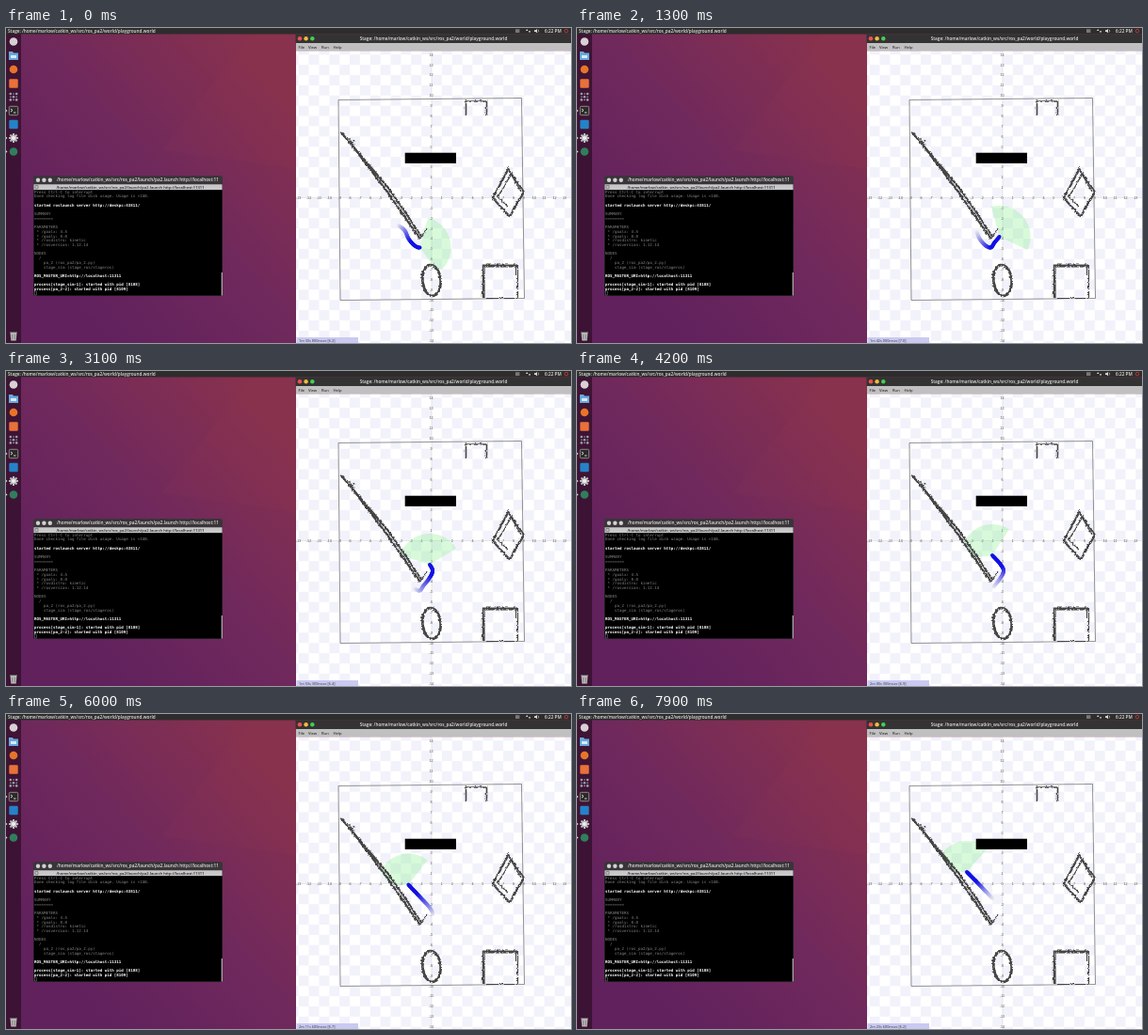
An HTML page that plays this animation: 600 px wide and 335 px high, repeating every 8 s.

```html
<!DOCTYPE html>
<html lang="en">
<head>
<meta charset="utf-8">
<title>Robot simulation</title>
<style>
html, body { margin: 0; width: 100%; height: 100%; overflow: hidden; background: #2d2d2d; }
svg { display: block; width: 100vw; height: 100vh; }
text { white-space: pre; }
.title { font: 600 4.7px "Open Sans", "Noto Sans", sans-serif; fill: #e4e2de; }
.tab { font: 600 4.1px "Open Sans", "Noto Sans", sans-serif; fill: #222; }
.menu { font: 4.2px "Open Sans", "Noto Sans", sans-serif; fill: #111; }
.status { font: 3.8px "Open Sans", "Noto Sans", sans-serif; fill: #333; }
.term { font: 4.15px "DejaVu Sans Mono", "Liberation Mono", monospace; fill: #858585; }
.term .strong { font-weight: bold; fill: #fff; }
.axis { font: 3.7px "Liberation Sans", Arial, sans-serif; fill: #555; text-anchor: middle; }
.wall { fill: none; stroke: #444; stroke-width: 2.2; }
.thin { stroke-width: 1.2; }
</style>
</head>
<body>
<svg id="stage" viewBox="0 0 600 335" preserveAspectRatio="none">
  <defs>
    <linearGradient id="desk" gradientUnits="userSpaceOnUse" x1="60" y1="280" x2="300" y2="70">
      <stop offset="0" stop-color="#60215d"/>
      <stop offset=".5" stop-color="#70295c"/>
      <stop offset="1" stop-color="#87314e"/>
    </linearGradient>
    <pattern id="checks" patternUnits="userSpaceOnUse" x="452" y="180.5" width="21.74" height="21.74">
      <rect width="21.74" height="21.74" fill="#fff"/>
      <path d="M0 0h10.87v10.87H0zM10.87 10.87h10.87v10.87H10.87z" fill="#f2f2fb"/>
    </pattern>
    <filter id="rough" filterUnits="userSpaceOnUse" x="340" y="60" width="225" height="245">
      <feTurbulence type="turbulence" baseFrequency=".35" numOctaves="1" seed="4"/>
      <feDisplacementMap in="SourceGraphic" scale="2" xChannelSelector="R" yChannelSelector="G" result="bent"/>
      <feOffset in="bent" dx=".7" dy=".7"/>
    </filter>
    <clipPath id="termTitle"><rect x="50" y="157" width="175" height="10"/></clipPath>
  </defs>

  <rect width="600" height="335" fill="url(#desk)"/>
  <path d="M308 6V150L165 130L260 6z" fill="#a5424c" opacity=".06"/>
  <rect y="6" width="16" height="329" fill="#35112d" opacity=".82"/>
  <g id="launcher"></g>

  <rect width="600" height="6.5" fill="#2d2d2d"/>
  <text class="title" x="2" y="4.9">Stage: /home/marlow/catkin_ws/src/ros_pa2/world/playground.world</text>
  <g fill="#dfdbd2">
    <path d="M541 1.2h4.4v3.8H541z" fill="#777"/>
    <path d="M552 3l1.2-2 1.2 2zM554.8 3.2l1.2 2 1.2-2zM561 2.3h1.3l1.7-1.4v4.4l-1.7-1.4H561z"/>
    <path d="M565 1.6q1.6 1.5 0 3" fill="none" stroke="#dfdbd2" stroke-width=".6"/>
    <circle cx="595" cy="3.1" r="1.8" fill="none" stroke="#d33b3b" stroke-width=".8"/>
  </g>
  <text class="title" x="572" y="4.9">6:22 PM</text>

  <g id="terminal">
    <rect x="29" y="157" width="201" height="128" rx="2.5" fill="#393539"/>
    <g fill="#d2d0d2"><circle cx="34" cy="161.7" r="2.2"/><circle cx="40.4" cy="161.7" r="2.2"/><circle cx="46.8" cy="161.7" r="2.2"/></g>
    <text class="title" x="54" y="163.4" clip-path="url(#termTitle)">/home/marlow/catkin_ws/src/ros_pa2/launch/pa2.launch http://localhost:11311</text>
    <rect x="29.5" y="166.3" width="200" height="6" fill="#c9c8c9"/>
    <path d="M31 167.6h3v3.2h-3z" fill="none" stroke="#555" stroke-width=".6"/>
    <text class="tab" x="132" y="170.8" text-anchor="middle">/home/marlow/catkin_ws/src/ros_pa2/launch/pa2.launch http://localhost:11311</text>
    <rect x="29.5" y="172.3" width="200" height="112.2" fill="#000"/>
    <g id="output" class="term"></g>
    <rect x="30.2" y="280" width="2.2" height="4" fill="none" stroke="#888" stroke-width=".5"/>
    <rect x="228.7" y="260" width="1.2" height="24.5" fill="#b5b3b5"/>
  </g>

  <rect x="307.5" y="6.5" width="292.5" height="9.5" fill="#333"/>
  <circle cx="312" cy="11.2" r="2.3" fill="#f0504e"/>
  <circle cx="318.6" cy="11.2" r="2.2" fill="#f3bd3c"/>
  <circle cx="325.3" cy="11.2" r="2.2" fill="#43cf52"/>
  <text class="title" x="454" y="13" text-anchor="middle">Stage: /home/marlow/catkin_ws/src/ros_pa2/world/playground.world</text>
  <rect x="308" y="16" width="292" height="8.3" fill="#c0c0c0"/>
  <g class="menu"><text x="310.5" y="21.8">File</text><text x="321" y="21.8">View</text><text x="335" y="21.8">Run</text><text x="347.5" y="21.8">Help</text></g>

  <rect x="308" y="24.3" width="292" height="310.7" fill="url(#checks)"/>
  <path d="M308 180.5H600M452 24.3V335" stroke="#bbb" stroke-width=".5" opacity=".6"/>
  <g id="labels" class="axis"></g>
  <polygon id="scan" fill="#78ee80" fill-opacity=".29"/>

  <path d="M353 76.5L547.5 74.5L550.5 287.5L355 289.5z" fill="none" stroke="#666" stroke-width=".7"/>
  <g class="wall" filter="url(#rough)">
    <path d="M353.5 108.5L366 123.5L402 171L437.5 222M365 122L404 168L426 200L440 221"/>
    <path class="thin" d="M361 114L368 123M369 118L364 122M438 222.5L445 212"/>
    <path d="M486.5 91V76H508.5V91" stroke-width="1.6"/>
    <path d="M531.5 148L548 172.5L533 198.5L515 179z"/>
    <path class="thin" d="M535 153L520.5 178L531 188M535 155L545 172"/>
    <ellipse cx="450" cy="266.5" rx="9.6" ry="16.4" stroke-width="2.6" transform="rotate(-5 450 266.5)"/>
    <path d="M541 251H505.2V285" stroke-width="2.8"/>
    <path class="thin" d="M541.5 250V285.5H508M539.5 252V261"/>
  </g>
  <rect x="423.7" y="132.7" width="54.3" height="11.2" fill="#000"/>
  <g id="trail" stroke-width="4" stroke-linecap="round"></g>

  <rect x="308.5" y="329" width="65.5" height="6" fill="#c9c9f2"/>
  <text id="clock" class="status" x="311" y="333.6"></text>
</svg>
<script>
const LOOP = 8000, STEP = 100, TRAIL = 37, RANGE = 33, HALF_VIEW = 65;
const UNIT = 10.87, ORIGIN = { x: 452, y: 180.5 };
const $ = id => document.getElementById(id);

function add(parent, tag, attrs, content = '') {
  const el = document.createElementNS('http://www.w3.org/2000/svg', tag);
  for (const key in attrs) el.setAttribute(key, attrs[key]);
  el.textContent = content;
  return parent.appendChild(el);
}

// time, x, y, heading in degrees
const route = [
  [-3700, 417, 210, 45], [-2600, 423.5, 215.5, 50], [-1700, 427.5, 224, 50], [-700, 433.5, 231, 20],
  [0, 439.5, 233.5, -11], [650, 443.5, 228, -25], [1300, 448.5, 222, -40], [2300, 453, 213, -72],
  [3100, 450, 206, -97], [4200, 441, 196, -122], [5200, 432.5, 187, -121],
  [6700, 423, 177, -114], [7900, 414, 168, -114]
];

function pose(t) {
  let i = 0;
  while (i < route.length - 2 && t > route[i + 1][0]) i++;
  const a = route[i], b = route[i + 1];
  const before = route[Math.max(i - 1, 0)], after = route[Math.min(i + 2, route.length - 1)];
  const span = b[0] - a[0], u = (t - a[0]) / span;
  const mix = k => {
    const m0 = (b[k] - before[k]) / (b[0] - before[0]) * span;
    const m1 = (after[k] - a[k]) / (after[0] - a[0]) * span;
    const u2 = u * u, u3 = u2 * u;
    return (2 * u3 - 3 * u2 + 1) * a[k] + (u3 - 2 * u2 + u) * m0 + (3 * u2 - 2 * u3) * b[k] + (u3 - u2) * m1;
  };
  return { x: mix(1), y: mix(2), heading: a[3] + (b[3] - a[3]) * u };
}

// obstacles near the route, as segments x1, y1, x2, y2
const obstacles = [
  [354, 109, 438, 222], [438, 222, 445, 213],
  [424, 144, 478, 144], [424, 133, 424, 144], [442, 253, 458, 253]
];

function rayLength(p, dx, dy) {
  let best = RANGE;
  for (const [x1, y1, x2, y2] of obstacles) {
    const sx = x2 - x1, sy = y2 - y1, det = dx * sy - dy * sx;
    if (Math.abs(det) < 1e-6) continue;
    const qx = x1 - p.x, qy = y1 - p.y;
    const along = (qx * sy - qy * sx) / det, on = (qx * dy - qy * dx) / det;
    if (along > 0 && on >= 0 && on <= 1) best = Math.min(best, along);
  }
  return best;
}

function scanPoints(p) {
  const points = [`${p.x},${p.y}`];
  for (let a = -HALF_VIEW; a <= HALF_VIEW; a += 2) {
    const rad = (p.heading + a) * Math.PI / 180;
    const dx = Math.cos(rad), dy = Math.sin(rad), r = rayLength(p, dx, dy);
    points.push(`${(p.x + dx * r).toFixed(2)},${(p.y + dy * r).toFixed(2)}`);
  }
  return points.join(' ');
}

function buildLabels() {
  for (let n = -14; n <= 14; n++) {
    if (n && Math.abs(n) < 14) add($('labels'), 'text', { x: ORIGIN.x + n * UNIT, y: ORIGIN.y + 1.4 }, n);
    add($('labels'), 'text', { x: ORIGIN.x - .5, y: ORIGIN.y - n * UNIT + 1.4 }, n);
  }
}

function buildTerminal() {
  // a leading ! marks a bright line
  const lines = `Press Ctrl-C to interrupt
Done checking log file disk usage. Usage is <1GB.

!started roslaunch server http://deskpc:43811/

SUMMARY
========

PARAMETERS
 * /goalx: 4.5
 * /goaly: 8.0
 * /rosdistro: kinetic
 * /rosversion: 1.12.14

NODES
  /
    pa_2 (ros_pa2/pa_2.py)
    stage_sim (stage_ros/stageros)

!ROS_MASTER_URI=http://localhost:11311

!process[stage_sim-1]: started with pid [8108]
!process[pa_2-2]: started with pid [8109]`.split('\n');
  lines.forEach((line, i) => {
    const strong = line.startsWith('!');
    add($('output'), 'text', { x: 30, y: 175.5 + i * 4.71, class: strong ? 'strong' : '' }, strong ? line.slice(1) : line);
  });
}

function buildLauncher() {
  const box = $('launcher');
  const disc = (y, fill) => add(box, 'circle', { cx: 8, cy: y, r: 4.3, fill });
  const tile = (y, fill, stroke = 'none') =>
    add(box, 'rect', { x: 3.3, y: y - 4.7, width: 9.4, height: 9.4, rx: 1.2, fill, stroke, 'stroke-width': .8 });
  const path = (d, fill, stroke = 'none') => add(box, 'path', { d, fill, stroke, 'stroke-width': .8 });
  disc(14.5, '#d8d0d4');
  path('M3 25h4l1 1.5h5v7.5H3z', '#67a9dc');
  path('M5 29h6v3H5z', '#d6ebf8');
  disc(44, '#e8742a');
  tile(59, '#e9713a');
  for (let i = 0; i < 9; i++)
    add(box, 'circle', { cx: 4.8 + i % 3 * 3.2, cy: 70 + Math.floor(i / 3) * 3.2, r: i % 2 ? .8 : 1.3, fill: '#9aa3a8' });
  tile(88, '#2b2a29', '#a7a39f');
  path('M5 86l2 1.5-2 1.5M8 90h2.5', 'none', '#fff');
  tile(102.5, '#2582c8');
  for (let a = 0; a < 360; a += 45)
    add(box, 'rect', { x: 7, y: 112, width: 2, height: 3, fill: '#b9b9bd', transform: `rotate(${a} 8 117)` });
  add(box, 'circle', { cx: 8, cy: 117, r: 2.8, fill: '#eee', stroke: '#b9b9bd', 'stroke-width': 1.4 });
  disc(131.5, '#2f7f5c');
  path('M4.5 324h7l-.8 8.5H5.3z', '#b9b6b6');
  path('M4 323.5h8M6.7 326v5M9.3 326v5', 'none', '#777');
  for (const y of [88, 117, 131.5]) path(`M0 ${y - 1.3}l1.5 1.3L0 ${y + 1.3}z`, '#ddd');
}

const trail = Array.from({ length: TRAIL }, (_, i) => {
  const strength = Math.min(1, 1.45 * (i + 1) / TRAIL);
  const tint = floor => Math.round(240 - (240 - floor) * strength);
  return add($('trail'), 'line', { stroke: `rgb(${tint(18)},${tint(18)},${tint(228)})` });
});

function simClock(t) {
  const ms = Math.round((93.8 + t * .0063) * 10) * 100;
  const seconds = Math.floor(ms / 1000);
  const rate = (6.6 - .4 * Math.cos(t / 420)).toFixed(1);
  return `${Math.floor(seconds / 60)}m ${String(seconds % 60).padStart(2, '0')}s ${String(ms % 1000).padStart(3, '0')}msec [${rate}]`;
}

function draw(t) {
  trail.forEach((line, i) => {
    const end = t - (TRAIL - 1 - i) * STEP;
    const a = pose(Math.max(end - STEP, route[0][0])), b = pose(end);
    line.setAttribute('x1', a.x);
    line.setAttribute('y1', a.y);
    line.setAttribute('x2', b.x);
    line.setAttribute('y2', b.y);
  });
  $('scan').setAttribute('points', scanPoints(pose(t)));
  $('clock').textContent = simClock(t);
}

buildLabels();
buildTerminal();
buildLauncher();

const start = performance.now();
function tick() {
  const t = (performance.now() - start) % LOOP;
  draw(Math.floor(t / STEP) * STEP);
  requestAnimationFrame(tick);
}
tick();
</script>
</body>
</html>
```
